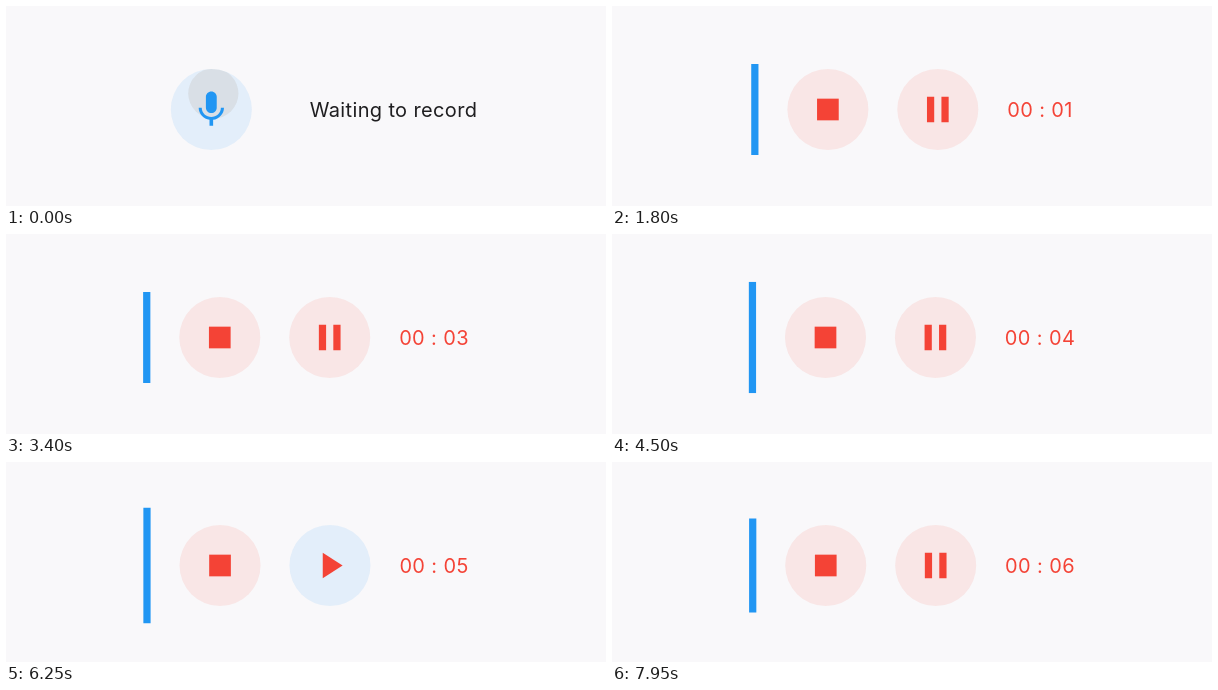
Animation of 600 by 200 pixels, one loop 8000 ms. Source, as an HTML page with a canvas:

```html
<!DOCTYPE html>
<html lang="en">
<head>
<meta charset="utf-8">
<title>Voice recorder</title>
<style>
  html, body { margin: 0; width: 100%; height: 100%; overflow: hidden; background: #f9f8fa; }
  canvas { display: block; }
</style>
</head>
<body>
<canvas id="stage" width="600" height="200"></canvas>
<script>
const ctx = document.getElementById('stage').getContext('2d');
const LOOP = 8000, MID_Y = 103.5;
const DP = 81 / 56;                       // layout units to pixels
const BAR = 5 * DP, GAP = 20 * DP, SIZE = 56 * DP, RADIUS = SIZE / 2;
const BLUE = '#2196f3', RED = '#f44336', INK = '#1f1e20';

const START = 350, PAUSE = 6080, RESUME = 6950;

const icons = {
  mic: new Path2D('M12 14c1.66 0 2.99-1.34 2.99-3L15 5c0-1.66-1.34-3-3-3S9 3.34 9 5v6c0 1.66 1.34 3 3 3z' +
    'm5.3-3c0 3-2.54 5.1-5.3 5.1S6.7 14 6.7 11H5c0 3.41 2.72 6.23 6 6.72V21h2v-3.28c3.28-.48 6-3.3 6-6.72h-1.7z'),
  stop: new Path2D('M6 6h12v12H6z'),
  pause: new Path2D('M6 19h4V5H6v14zm8-14v14h4V5h-4z'),
  play: new Path2D('M8 5v14l11-7z')
};

// Loudness over time: [ms, bar height]
const levels = [
  [START, 0], [480, 92], [620, 101], [800, 95], [1000, 91], [1250, 105], [1500, 93],
  [1800, 91], [2100, 115], [2400, 92], [2750, 107], [3050, 92], [3200, 95], [3400, 91],
  [3700, 107], [4000, 92], [4300, 95], [4700, 127], [5100, 116], [5600, 95.5],
  [5800, 93], [6200, 115.5], [7010, 115.5], [7250, 98], [7500, 92], [7750, 97], [7950, 94]
];

// A tap's ripple fills its button quickly, then fades.
const taps = {
  first: { at: -22, dx: 2, dy: -16 },
  pause: { at: 6000, dx: 0, dy: 0 },
  play: { at: 6950, dx: 0, dy: 0 }
};

const clamp = v => Math.min(1, Math.max(0, v));

function barHeight(t) {
  const next = levels.findIndex(([time]) => time > t);
  if (next === 0) return 0;
  if (next < 0) return levels[levels.length - 1][1];
  const [t0, h0] = levels[next - 1], [t1, h1] = levels[next];
  const p = (t - t0) / (t1 - t0);
  return h0 + (h1 - h0) * (1 - Math.cos(Math.PI * p)) / 2;
}

function disc(x, y, r, color, alpha) {
  ctx.globalAlpha = alpha;
  ctx.fillStyle = color;
  ctx.beginPath();
  ctx.arc(x, y, r, 0, 2 * Math.PI);
  ctx.fill();
  ctx.globalAlpha = 1;
}

function ripple(t, x, tap) {
  const age = t - tap.at;
  if (age < 0 || age > 250) return;
  ctx.save();
  ctx.beginPath();
  ctx.arc(x, MID_Y, RADIUS, 0, 2 * Math.PI);
  ctx.clip();
  const alpha = 0.4 * (1 - clamp((age - 30) / 200));
  disc(x + tap.dx, MID_Y + tap.dy, 24 * age / 22, '#c8c8c8', alpha);
  ctx.restore();
}

function button(t, left, icon, color, tint, tapList) {
  const x = left + RADIUS, unit = 30 / 24 * DP;
  disc(x, MID_Y, RADIUS, tint, 0.1);
  tapList.forEach(tap => ripple(t, x, tap));
  ctx.save();
  ctx.translate(x - 12 * unit, MID_Y - 12 * unit);
  ctx.scale(unit, unit);
  ctx.fillStyle = color;
  ctx.fill(icons[icon]);
  ctx.restore();
}

function seconds(t) {
  if (t < PAUSE) return Math.floor((t - START) / 1000);
  return 5 + Math.max(0, Math.floor((t - RESUME) / 970));
}

function draw(t) {
  const recording = t >= START;
  const paused = t >= PAUSE && t < RESUME;
  const label = recording ? '00 : ' + String(seconds(t)).padStart(2, '0') : 'Waiting to record';

  ctx.fillStyle = '#f9f8fa';
  ctx.fillRect(0, 0, 600, 200);
  ctx.font = '400 20px Inter, "Noto Sans", sans-serif';
  ctx.letterSpacing = '0.36px';

  // The row stays centred, so its left edge follows the label's width.
  const second = recording ? SIZE : 0;
  const width = BAR + 3 * GAP + SIZE + second + ctx.measureText(label).width;
  let x = 300 - width / 2;

  const height = barHeight(t);
  ctx.fillStyle = BLUE;
  ctx.fillRect(x, MID_Y - height / 2, BAR, height);
  x += BAR + GAP;

  const main = recording ? RED : BLUE;
  button(t, x, recording ? 'stop' : 'mic', main, main, [taps.first]);
  x += SIZE + GAP;

  if (recording) {
    button(t, x, paused ? 'play' : 'pause', RED, paused ? BLUE : RED, [taps.pause, taps.play]);
  }
  x += second + GAP;

  ctx.fillStyle = recording ? RED : INK;
  ctx.fillText(label, x, 110.7);
}

const begin = performance.now();
function frame() {
  draw((performance.now() - begin) % LOOP);
  requestAnimationFrame(frame);
}
frame();
</script>
</body>
</html>
```
